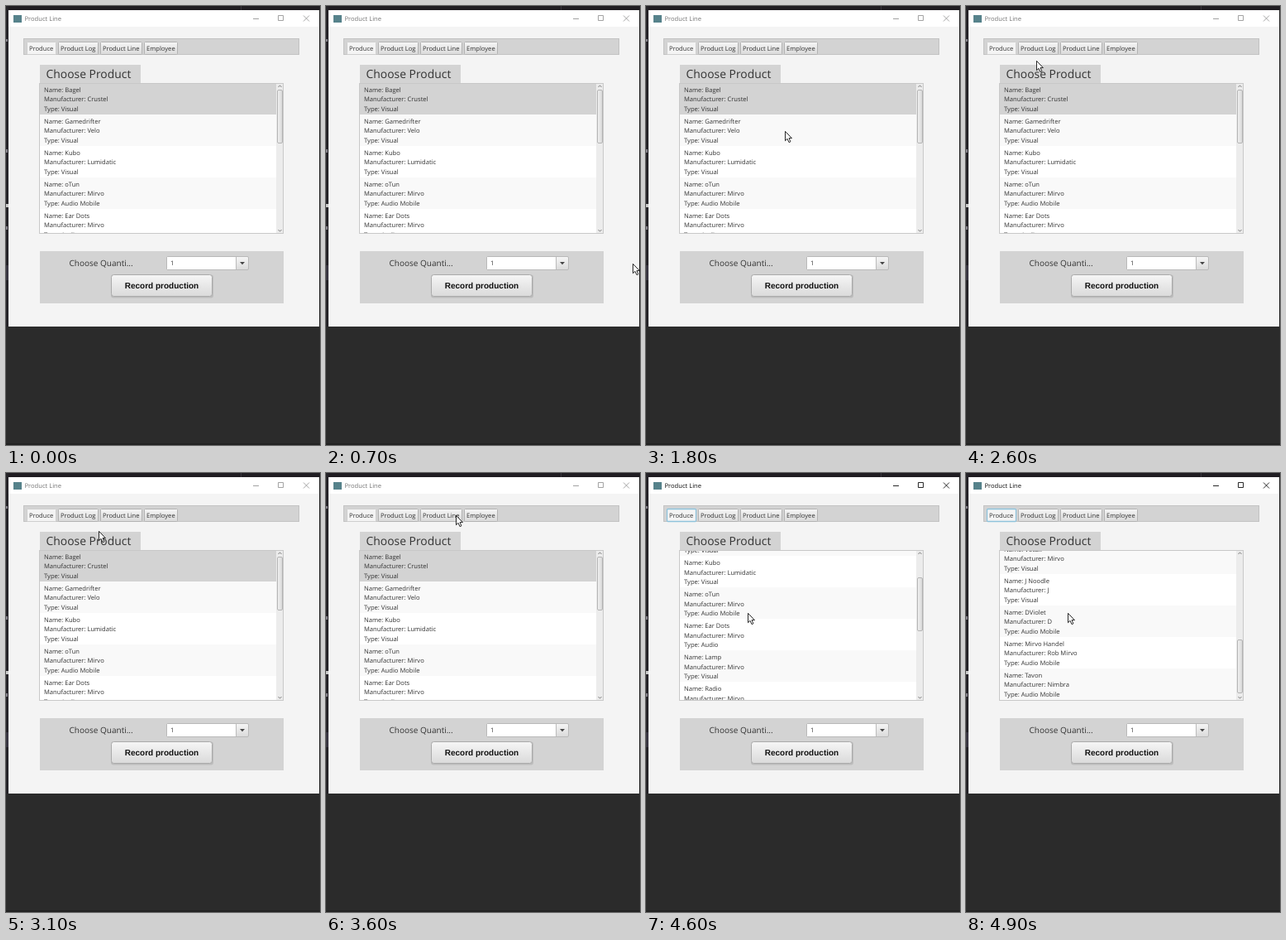
These frames come from a looping animation (380 by 530 pixels, 5000 ms). An HTML page:

```html
<!DOCTYPE html>
<html lang="en">
<head>
<meta charset="utf-8">
<title>Product Line</title>
<style>
html, body { margin: 0; width: 100%; height: 100%; overflow: hidden; background: #2b2b2b; }
svg { display: block; }
text { font: 7.6px "Open Sans", "Noto Sans", sans-serif; fill: #333; text-rendering: geometricPrecision; white-space: pre; }
.button { font: bold 10px "Liberation Sans", Arial, sans-serif; fill: #111; }
.heading { font-size: 13.9px; }
.label { font-size: 10px; }
#chrome { fill: none; stroke: #999; }
#chrome text { fill: #777; stroke: none; }
#chrome.active { stroke: #111; }
#chrome.active text { fill: #111; }
</style>
</head>
<body>
<svg width="380" height="530" viewBox="0 0 380 530">
  <defs>
    <linearGradient id="face" x2="0" y2="1">
      <stop stop-color="#f6f6f6"/><stop offset="1" stop-color="#dadada"/>
    </linearGradient>
    <linearGradient id="thumbFace">
      <stop stop-color="#f1f1f1"/><stop offset="1" stop-color="#d8d8d8"/>
    </linearGradient>
    <clipPath id="view"><rect x="41" y="93" width="286" height="181"/></clipPath>
  </defs>

  <!-- Desktop behind the window -->
  <rect width="380" height="530" fill="#2b2b2b"/>
  <rect width="380" height="5" fill="#201d22"/>
  <rect width="3" height="387" fill="#252328"/>
  <rect y="313" width="3" height="18" fill="#393642"/>
  <rect x="284" width="1" height="5" fill="#38343b"/>
  <rect y="528" width="380" height="2" fill="#222"/>
  <g fill="#85828a">
    <rect y="40" width="2" height="3"/><rect y="173" width="2" height="4"/><rect y="266" width="2" height="4"/>
    <rect y="239" width="3" height="4" fill="#ccc"/>
  </g>

  <!-- Window -->
  <rect x="3" y="5" width="376" height="382" fill="#f4f4f4"/>
  <rect x="3" y="5" width="376" height="20" fill="#fff"/>
  <rect x="9" y="11" width="10" height="9" fill="#56828b"/>
  <g id="chrome">
    <text x="22.5" y="18">Product Line</text>
    <path d="M299 15.5h7M329.5 11.5h6v6h-6zM360 11.5l7 7m0-7l-7 7" stroke-width=".9"/>
  </g>

  <!-- Tabs -->
  <rect x="21.5" y="39.5" width="333" height="19" fill="#d3d3d3" stroke="#c3c3c3"/>
  <g id="tabs"></g>
  <rect id="focus" x="25.5" y="43.5" width="35" height="15" rx="1" fill="none" stroke="#8fc3dc" stroke-width="1.3"/>

  <!-- Product list -->
  <rect x="41" y="71" width="122" height="22" fill="#d3d3d3"/>
  <text class="heading" x="48.5" y="87">Choose Product</text>
  <rect x="41" y="93" width="295" height="182" fill="#fff"/>
  <g clip-path="url(#view)"><g id="rows"></g></g>
  <rect x="327" y="93" width="9" height="182" fill="#ececec"/>
  <rect id="thumb" x="328.5" y="101.5" width="6" height="64" rx="1.5" fill="url(#thumbFace)" stroke="#b5b5b5"/>
  <path d="M329.5 98l2-2.2 2 2.2M329.5 270l2 2.2 2-2.2" fill="none" stroke="#777" stroke-width=".9"/>
  <rect x="40.5" y="93.5" width="295" height="181" fill="none" stroke="#c8c8c8"/>

  <!-- Quantity panel -->
  <rect x="41" y="296" width="295" height="63" fill="#d3d3d3"/>
  <text class="label" x="76.5" y="314">Choose Quanti...</text>
  <rect x="194.5" y="302.5" width="99" height="16" rx="1.5" fill="url(#face)" stroke="#b9b9b9"/>
  <rect x="195" y="303" width="83" height="15" fill="#fff"/>
  <path d="M278.5 303v15" stroke="#bbb"/>
  <path d="M283 309h6l-3 3.2z" fill="#444"/>
  <text x="199" y="313">1</text>
  <rect x="127" y="324.5" width="124" height="28" rx="3" fill="#bdbdbd"/>
  <rect x="127.5" y="324.5" width="122" height="26" rx="3" fill="url(#face)" stroke="#aaa"/>
  <text class="button" x="188.5" y="341" text-anchor="middle">Record production</text>

  <path id="cursor" d="M.5.3v11.4l2.5-2.4 2 4.3 1.9-.8-1.9-4.2h3.4z" fill="#fff" stroke="#111" stroke-width=".9"/>
</svg>
<script>
const $ = id => document.getElementById(id);
const text = (x, y, s) => `<text x="${x}" y="${y}">${s}</text>`;

const tabs = [["Produce", 25, 36], ["Product Log", 63, 49], ["Product Line", 114, 51], ["Employee", 167, 41]];
$("tabs").innerHTML = tabs.map(([name, x, w], i) =>
  `<rect x="${x + .5}" y="43.5" width="${w - 1}" height="15" rx="1" fill="${i ? "url(#face)" : "#f4f4f4"}"
    stroke="${i ? "#b3b3b3" : "#cfcfcf"}"/>` + text(x + 3, 54, name)).join("");

const ROW = 38, MAX_SCROLL = 275, MAX_THUMB = 100;
const products = [
  ["Bagel", "Crustel", "Visual"],
  ["Gamedrifter", "Velo", "Visual"],
  ["Kubo", "Lumidatic", "Visual"],
  ["oTun", "Mirvo", "Audio Mobile"],
  ["Ear Dots", "Mirvo", "Audio"],
  ["Lamp", "Mirvo", "Visual"],
  ["Radio", "Mirvo", "Audio"],
  ["Vocall", "Mirvo", "Visual"],
  ["J Noodle", "J", "Visual"],
  ["DViolet", "D", "Audio Mobile"],
  ["Mirvo Handel", "Rob Mirvo", "Audio Mobile"],
  ["Tavon", "Nimbra", "Audio Mobile"]
];
$("rows").innerHTML = products.map(([name, maker, type], i) => {
  const y = 93 + i * ROW;
  const fill = i === 0 ? "#d3d3d3" : i % 2 ? "#f9f9f9" : "#fff";
  return `<rect x="41" y="${y}" width="286" height="${ROW}" fill="${fill}"/>` +
    text(46, y + 11, "Name: " + name) +
    text(46, y + 22.4, "Manufacturer: " + maker) +
    text(46, y + 33.8, "Type: " + type);
}).join("");

// Pointer strokes: start time, then one x,y pair per 100 ms
const strokes = [
  [700, 371, 311, 346, 287, 312, 256, 277, 225, 254, 206],
  [1300, 245, 199, 229, 187, 211, 174, 192, 162, 177, 154, 168, 151],
  [2000, 142, 137, 101, 117, 72, 102],
  [2400, 49, 78, 60, 59, 85, 66, 115, 110, 122, 126],
  [3000, 102, 98, 112, 70, 148, 50, 180, 47, 193, 52, 162, 50],
  [3600, 157, 51, 145, 47, 131, 57, 127, 70, 132, 82, 140, 92],
  [4200, 131, 130, 123, 169]
];

function draw(now) {
  const t = Math.floor(now % 5000 / 100) * 100;

  const stroke = strokes.filter(s => s[0] <= t).pop();
  $("cursor").style.display = stroke ? "" : "none";
  if (stroke) {
    const [start, ...points] = stroke;
    const i = Math.min((t - start) / 100, points.length / 2 - 1) * 2;
    $("cursor").setAttribute("transform", `translate(${points[i]} ${points[i + 1]})`);
  }

  const scroll = Math.max(0, Math.min(1, (t - 4500) / 400));
  $("rows").setAttribute("transform", `translate(0 ${-scroll * MAX_SCROLL})`);
  $("thumb").setAttribute("transform", `translate(0 ${scroll * MAX_THUMB})`);

  const active = t >= 4600;
  $("chrome").classList.toggle("active", active);
  $("focus").style.display = active ? "" : "none";
}

const begin = performance.now();
(function tick() {
  draw(performance.now() - begin);
  requestAnimationFrame(tick);
})();
</script>
</body>
</html>
```
